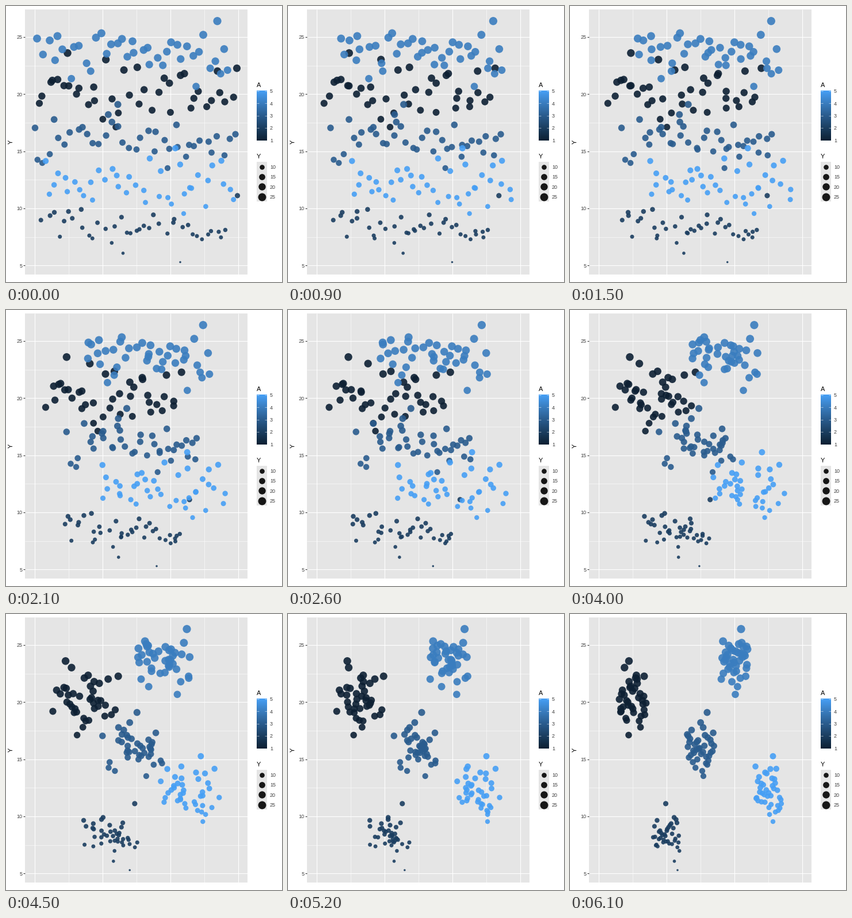
A matplotlib script for the animation above (10000 ms loop, 480 by 480 pixels).

```python
import matplotlib.pyplot as plt
import numpy as np
from matplotlib.animation import FuncAnimation
from matplotlib.colors import LinearSegmentedColormap
from matplotlib.patches import Rectangle

plt.rcParams["font.family"] = "Liberation Sans"

SIZE, DPI = 480, 80
PT = 72 / DPI  # points per pixel
FRAMES, INTERVAL = 100, 100
MOVE_FRAMES = 61
ALPHA = 0.9
PER_GROUP = 40
Y_MIN, Y_MAX = 5.3, 26.4
LEFT, TOP, WIDTH, HEIGHT = 33, 5.5, 387, 461
GREY, INK, TEXT = "#e5e5e5", "#333333", "#404040"
COLORS = ["#0d2033", "#1b3e60", "#2a5c8e", "#3a7dbf", "#469ff5"]

# A few outlying points of each group: start x, end x, value
OUTLIERS = [
    [(58, 89, 19.2), (107, 102.5, 23.6), (401.5, 129, 22.27), (191, 102, 17.12)],
    [(303, 187, 5.3), (203.5, 181.5, 6.08), (402.5, 166.5, 11.12)],
    [(194.5, 238.5, 19.1), (50.5, 205.5, 17.05), (281, 232, 13.53)],
    [(367.5, 297.5, 26.4), (54, 307, 24.87), (330.5, 287.5, 20.68)],
    [(294.5, 353, 15.27), (69, 348.5, 14.15), (309, 353, 9.55)],
]
# Remaining points: start x range, then low, mode and high of the value
SPREAD = [
    (60, 398, 17.5, 19.8, 23.4),
    (60, 390, 6.9, 7.8, 10.4),
    (52, 400, 13.7, 15.8, 18.4),
    (60, 392, 20.9, 24.3, 25.7),
    (68, 403, 9.7, 11.6, 15),
]


def to_y(value):
    return 54 + (25 - value) * 19.87


def marker_area(value):
    size = 1 + 5 * np.sqrt((value - Y_MIN) / (Y_MAX - Y_MIN))
    radius = 0.375 * (size * 2.845 + 0.945) + 0.35
    return (2 * radius * PT) ** 2


def triangular(u, low, mode, high):
    span = high - low
    rising = low + np.sqrt(u * span * (mode - low))
    falling = high - np.sqrt((1 - u) * span * (high - mode))
    return np.where(u < (mode - low) / span, rising, falling)


def make_group(index, rng):
    outliers = np.array(OUTLIERS[index])
    n = PER_GROUP - len(outliers)
    x_low, x_high, *shape = SPREAD[index]
    # Evenly filled slots keep the scatter from clumping
    u = (np.arange(n) + rng.random(n)) / n
    start = x_low + (x_high - x_low) * u
    end = 50 + 59 * (index + 1) + 47 * (rng.permutation(u) - 0.5)
    value = triangular(rng.permutation(u), *shape)
    return np.vstack([outliers, np.column_stack([start, end, value])])


def label(x, y, text, size=9, color=TEXT, **style):
    ax.text(x, y, text, fontsize=size * PT, color=color, **style)


def line(xs, ys, color, width, z):
    ax.plot(xs, ys, color=color, lw=width * PT, zorder=z, solid_capstyle="butt")


def draw_panel():
    right, bottom = LEFT + WIDTH, TOP + HEIGHT
    ax.add_patch(Rectangle((LEFT, TOP), WIDTH, HEIGHT, fc=GREY, lw=0, zorder=0))
    for i in range(7):
        x = 50 + 59 * i
        line([x, x], [TOP, bottom], "white", 0.55 if i % 2 else 1.1, 1)
    for i in range(9):
        y = to_y(5 + 2.5 * i)
        line([LEFT, right], [y, y], "white", 0.55 if i % 2 else 1.1, 1)
        if i % 2 == 0:
            line([LEFT - 2.8, LEFT], [y, y], INK, 1.1, 1)
            label(28.3, y + 3.2, 5 + 5 * i // 2, ha="right")
    label(9, 236.5, "Y", 11, "black", rotation=90, ha="center", va="center")


def draw_legends():
    label(436, 141, "A", 11, "black")
    ramp = LinearSegmentedColormap.from_list("ramp", COLORS)
    ax.imshow(np.linspace(1, 0, 256)[:, None], cmap=ramp, aspect="auto",
              extent=(436, 453.5, 234, 147.7), zorder=1)
    for step in range(1, 6):
        y = 233.6 - (step - 1) * 21.4
        label(459, y + 3.2, step)
        for x in (436, 450):
            line([x, x + 3.5], [y, y], "white", 0.5, 2)

    label(436, 265, "Y", 11, "black")
    ax.add_patch(Rectangle((436, 271), 17.5, 69, fc=GREY, lw=0, zorder=0))
    for row in range(4):
        value, y = 10 + 5 * row, 279.9 + row * 17.28
        ax.scatter(444.8, y, s=marker_area(value), c="black", alpha=ALPHA, lw=0)
        label(459, y + 3.2, value)


fig = plt.figure(figsize=(SIZE / DPI, SIZE / DPI), dpi=DPI, facecolor="white")
ax = fig.add_axes([0, 0, 1, 1])
draw_panel()
draw_legends()
ax.set(xlim=(0, SIZE), ylim=(SIZE, 0))
ax.axis("off")

rng = np.random.default_rng(12)
start, end, values = np.vstack([make_group(i, rng) for i in range(5)]).T
dots = ax.scatter(start, to_y(values), s=marker_area(values),
                  c=np.repeat(COLORS, PER_GROUP), alpha=ALPHA, lw=0, zorder=3)


def update(frame):
    progress = np.interp(frame, [0, 45, MOVE_FRAMES], [0, 0.757, 1])
    x = start + (end - start) * progress
    dots.set_offsets(np.column_stack([x, to_y(values)]))
    return [dots]


animation = FuncAnimation(fig, update, frames=FRAMES, interval=INTERVAL,
                          repeat=True, repeat_delay=0)
plt.show()
```
